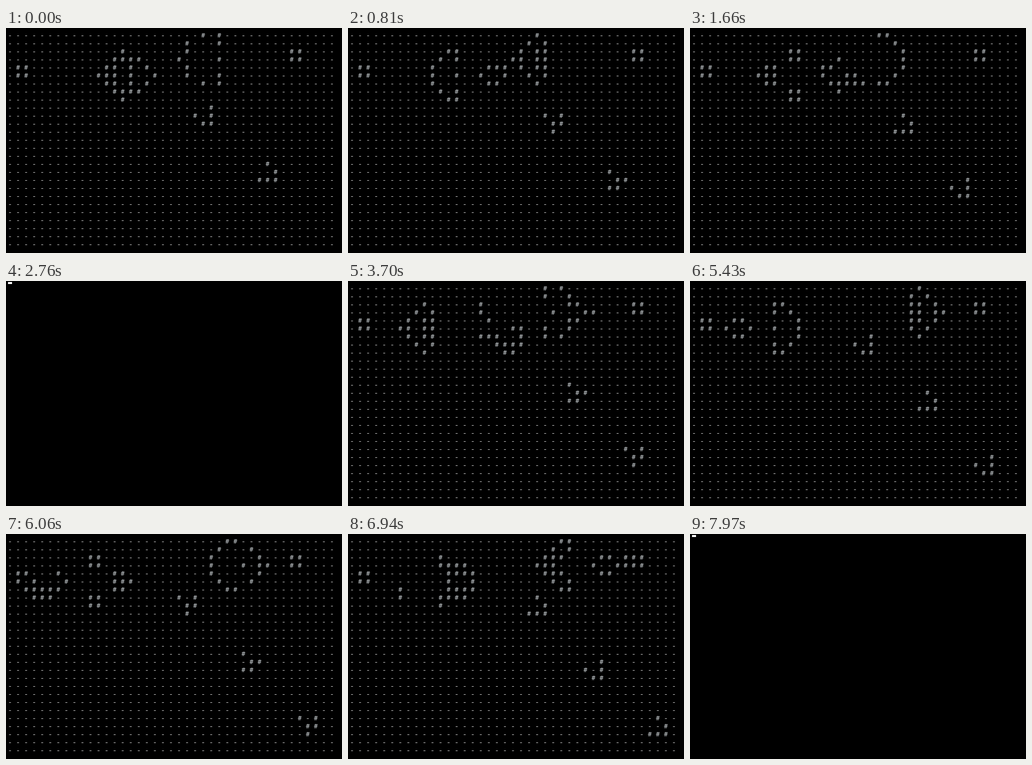
Animation, 668 px wide and 448 px high, one loop 8 s. Source, as an HTML page with a canvas:

```html
<!DOCTYPE html>
<html lang="en">
<head>
<meta charset="utf-8">
<title>Life in a terminal</title>
<style>
  html, body { margin: 0; width: 100%; height: 100%; overflow: hidden; background: #000; }
  canvas { display: block; }
</style>
</head>
<body>
<canvas id="screen" width="668" height="448"></canvas>
<script>
const COLS = 41, ROWS = 27, CELL = 16, LOOP = 8000;
const BLANK = 80; // how long the screen stays cleared before printing

// Four generations run in each stretch between these times
const BEATS = [100, 1270, 2440, 3610, 4820, 5980, 7080, 8200];
const clears = BEATS.slice(0, -1).flatMap((start, i) =>
  [0, 1, 2, 3].map(n => start + n * 0.2645 * (BEATS[i + 1] - start)));

const makeGrid = rule => Array.from({ length: ROWS }, (_, y) =>
  Array.from({ length: COLS }, (_, x) => rule(x, y)));

// Adds the lower half of a shape that is symmetric about its last row
const mirror = rows => [...rows, ...rows.slice(0, -1).reverse()];

function stamp(grid, left, top, rows) {
  rows.forEach((row, y) => [...row].forEach((c, x) => {
    if (c === '#') grid[top + y][left + x] = 1;
  }));
}

function gliderGun() {
  const grid = makeGrid(() => 0);
  const block = ['##', '##'];
  stamp(grid, 1, 4, block);
  stamp(grid, 35, 2, block);
  stamp(grid, 11, 2, mirror(['---#', '--####', '-##-#-#', '###-#--#']));
  stamp(grid, 21, 0, mirror(['---#-#', '-#---#', '-#', '#----#']));
  stamp(grid, 23, 9, ['--#', '#-#', '-##']);
  stamp(grid, 31, 16, ['-#', '--#', '###']);
  return grid;
}

function evolve(grid) {
  return makeGrid((x, y) => {
    let around = -grid[y][x];
    for (let dy = -1; dy <= 1; dy++)
      for (let dx = -1; dx <= 1; dx++) around += grid[y + dy]?.[x + dx] ?? 0;
    return around === 3 || (around === 2 && grid[y][x]) ? 1 : 0;
  });
}

const generations = [gliderGun()];
for (const _ of clears) generations.push(evolve(generations.at(-1)));

const ctx = document.getElementById('screen').getContext('2d', { alpha: false });
ctx.font = '13.333px "Noto Sans Mono", "Liberation Mono", monospace';

function draw(time) {
  ctx.fillStyle = '#000';
  ctx.fillRect(0, 0, 668, 448);
  const age = clears.filter(t => t <= time).length;
  if (age && time < clears[age - 1] + BLANK) {
    ctx.fillStyle = '#fff';
    ctx.fillRect(4, 2, 8, 4);
    return;
  }
  generations[age].forEach((row, y) => row.forEach((alive, x) => {
    ctx.fillStyle = alive ? '#dce2e6' : '#ccc';
    ctx.fillText(alive ? '#' : '-', 4 + x * CELL, 19 + y * CELL);
  }));
}

const start = performance.now();
function tick() {
  draw((performance.now() - start) % LOOP);
  requestAnimationFrame(tick);
}
tick();
</script>
</body>
</html>
```
